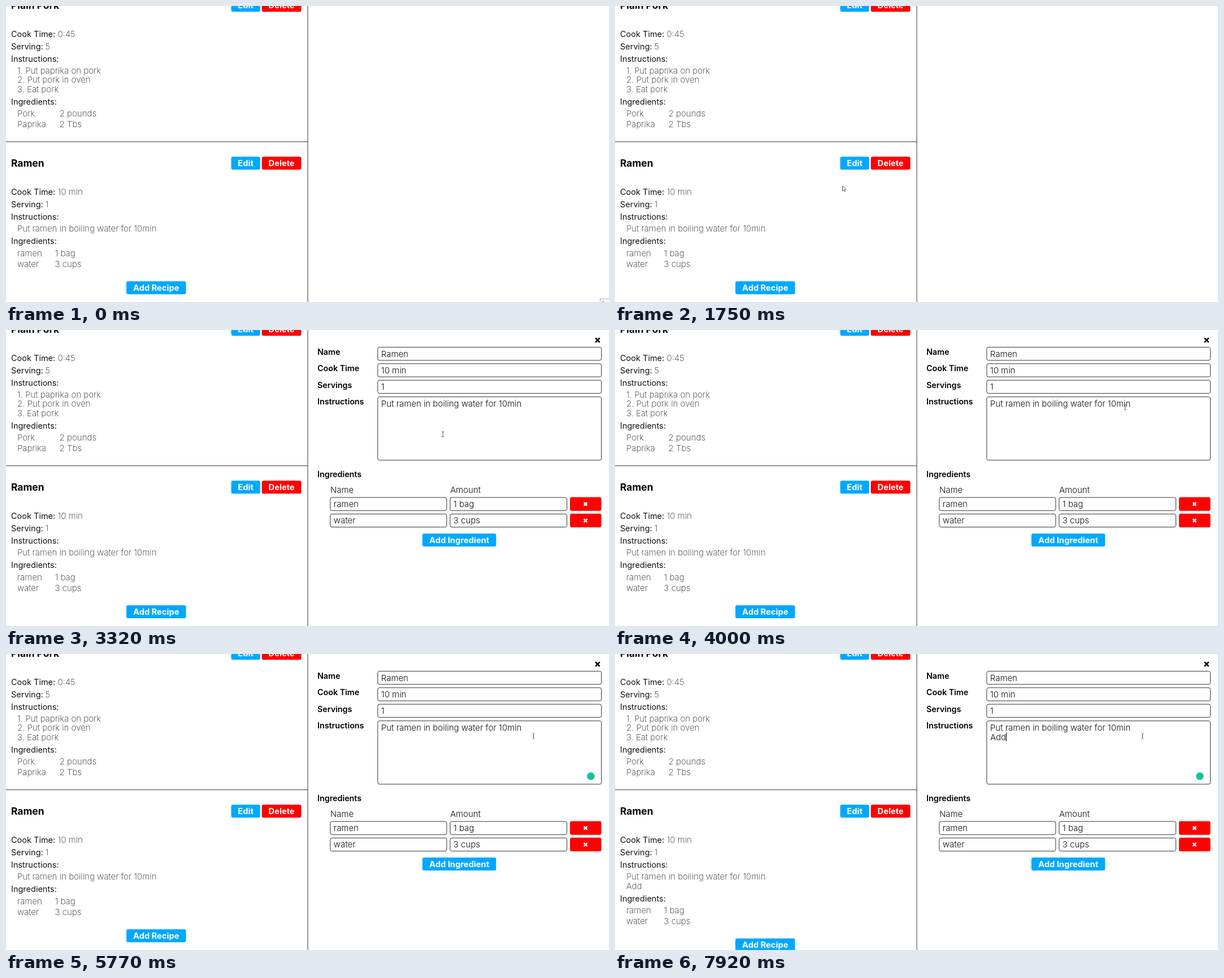
An HTML page that plays this animation: 1067x525 px, repeating every 7990 ms.

```html
<!DOCTYPE html>
<html lang="en">
<head>
<meta charset="utf-8">
<title>Recipe editor</title>
<style>
  html, body { margin: 0; width: 100%; height: 100%; overflow: hidden; background: #fff; }
  svg { display: block; width: 1067px; height: 525px; }
  text { font: 400 14.5px Inter, sans-serif; fill: #111; }
  .light { font-size: 15.1px; font-weight: 250; fill: #222; }
  .value { font-size: 14.95px; font-weight: 350; }
  .bold { font-size: 14.3px; font-weight: 600; fill: #000; }
  .title { font-size: 17.4px; font-weight: 700; fill: #000; }
  .button { font-size: 14.7px; font-weight: 700; fill: #fff; text-anchor: middle; }
  .field { fill: #fff; stroke: #333; }
  .rule { stroke: #333; }
  .cross { stroke-width: 2.6; fill: none; }
</style>
</head>
<body>
<svg id="stage" viewBox="0 0 1067 525"></svg>
<script>
const LOOP = 7990, BLUE = '#00a8ff', DARK_BLUE = '#0077b5', RED = '#f00';
const stage = document.getElementById('stage');
const $ = id => document.getElementById(id);

const text = (x, y, str, cls = '', id = '') =>
  `<text x="${x}" y="${y}" class="${cls}" id="${id}">${str}</text>`;
const box = (x, y, w, h, attrs) =>
  `<rect x="${x}" y="${y}" width="${w}" height="${h}" rx="3" ${attrs}/>`;
const field = (x, y, w, h, value) =>
  box(x, y, w, h, 'class="field"') + text(x + 6, y + 17, value, 'value');
const button = (x, y, w, color, label, id = '') =>
  box(x, y, w, 23, `fill="${color}" id="${id}"`) + text(x + w / 2, y + 16.9, label, 'button');
const cross = (x, y, r, color) =>
  `<path class="cross" stroke="${color}" d="M${x - r} ${y - r}l${2 * r} ${2 * r}m0 ${-2 * r}l${-2 * r} ${2 * r}"/>`;

function recipeHead(y, name, time, servings, editId) {
  return text(9, y + 285, name, 'title') +
    button(398.5, y + 267.2, 51.2, BLUE, 'Edit', editId) +
    button(452.7, y + 267.2, 69.8, RED, 'Delete') +
    text(9, y + 334.5, 'Cook Time:') + text(91.5, y + 334.5, time, 'light') +
    text(9, y + 356.5, 'Serving:') + text(69.5, y + 356.5, servings, 'light') +
    text(9, y + 378.5, 'Instructions:');
}

function ingredientList(y, x, rows) {
  return text(9, y, 'Ingredients:') + rows.map(([name, amount], i) =>
    text(20, y + 21.7 + i * 19, name, 'light') + text(x, y + 21.7 + i * 19, amount, 'light')).join('');
}

function ingredientRow(y, name, amount) {
  return field(573.8, y, 206, 23.3, name) + field(785.8, y, 206.7, 23.3, amount) +
    box(998, y - .5, 55.5, 24.3, `fill="${RED}"`) + cross(1025.5, y + 11.7, 2.8, '#fff');
}

const recipes =
  recipeHead(-280, 'Plain Pork', '0:45', '5', 'porkEdit') +
  ['Put paprika on pork', 'Put pork in oven', 'Eat pork'].map((step, i) =>
    text(20, 120 + i * 16.3, `${i + 1}. ${step}`, 'light')).join('') +
  ingredientList(174.5, 94.5, [['Pork', '2 pounds'], ['Paprika', '2 Tbs']]) +
  recipeHead(0, 'Ramen', '10 min', '1', 'edit') +
  text(20, 400, 'Put ramen in boiling water for 10min', 'light') +
  text(20, 416.5, '', 'light', 'savedLine') +
  `<g id="below">${ingredientList(422.3, 86.5, [['ramen', '1 bag'], ['water', '3 cups']])}
   ${button(213, 488.2, 105.5, BLUE, 'Add Recipe')}</g>
   <path class="rule" d="M0 240.8H534M534 0V525"/>`;

const form = `<g id="form">
  ${cross(1046.8, 18, 3.8, '#000')}
  ${['Name', 'Cook Time', 'Servings', 'Instructions'].map((label, i) =>
    text(551, 44 + i * 29.3, label, 'bold')).join('')}
  ${['Ramen', '10 min', '1'].map((value, i) => field(657.8, 30.5 + i * 29.3, 395.7, 23.3, value)).join('')}
  ${field(657.8, 118.6, 395.7, 112.3, 'Put ramen in boiling water for 10min')}
  ${text(664, 152.5, '', 'value', 'typedLine')}
  <path id="caret" stroke="#000" d="M0 0v16"/>
  <circle id="badge" cx="1034.8" cy="216.8" r="6.8" fill="#15c39a"/>
  ${text(551, 261, 'Ingredients', 'bold')}${text(574, 288.5, 'Name', 'value')}${text(786, 288.5, 'Amount', 'value')}
  ${ingredientRow(297, 'ramen', '1 bag')}${ingredientRow(326.3, 'water', '3 cups')}
  ${button(736.8, 361.1, 130.5, BLUE, 'Add Ingredient')}
</g>`;

const pointers = `
  <g id="corner" fill="#fff" stroke="#aaa"><rect x="1051.5" y="519.5" width="20" height="9"/><path stroke="#555" d="M1055 524.5h3"/></g>
  <g id="pointer" stroke-linejoin="round">
    <path id="arrow" fill="#fff" stroke="#444" stroke-width=".9" d="M.5 0V9.3L2.6 7.4 4.1 10.6 5.5 10 4.1 6.9H6.7Z"/>
    <path id="hand" fill="#fff" stroke="#222" stroke-width=".9"
      d="M-1 1Q0-.6 1 1V5L4 5.6Q5.4 6 5.1 8L4.3 12H-.6L-3.6 8Q-4-.2 -1 7.8Z"/>
    <path id="beam" fill="none" stroke="#444" stroke-width=".9" d="M-2-4.5H-.7L0-4 .7-4.5H2M0-4V4M-2 4.5H-.7L0 4 .7 4.5H2"/>
  </g>`;

stage.innerHTML = recipes + form + pointers;

// Pointer path: time, x, y
const path = [
  [410, 1018, 520], [620, 830, 420], [830, 590, 338], [1000, 420, 314], [1170, 274, 338],
  [1290, 222, 374], [1430, 252, 385], [1600, 355, 350], [1750, 402, 319], [1960, 408, 292],
  [2060, 415, 283], [2160, 417, 280], [2560, 417, 280], [2700, 446, 322], [2850, 535, 360],
  [3000, 645, 352], [3150, 728, 262], [3320, 773, 185], [3400, 770, 186], [3520, 767, 184],
  [3700, 812, 167], [3900, 885, 143], [4130, 915, 133], [4280, 917, 133], [4440, 928, 142],
  [4600, 933.5, 145.5], [LOOP, 933.5, 145.5]
];

function pointerAt(t) {
  const i = Math.max(0, path.findIndex(p => p[0] > t) - 1);
  const at = n => path[Math.min(path.length - 1, Math.max(0, n))];
  const [a, b] = [at(i), at(i + 1)], span = b[0] - a[0];
  const u = Math.max(0, (t - a[0]) / span);
  const slope = (n, k) => {
    const p = at(n - 1), q = at(n), r = at(n + 1);
    const d0 = (q[k] - p[k]) / (q[0] - p[0] || 1), d1 = (r[k] - q[k]) / (r[0] - q[0] || 1);
    return d0 * d1 > 0 ? 2 * d0 * d1 / (d0 + d1) : 0;
  };
  return [1, 2].map(k =>
    a[k] + (b[k] - a[k]) * u * u * (3 - 2 * u) +
    span * u * (1 - u) * ((1 - u) * slope(i, k) - u * slope(i + 1, k)));
}

const show = (id, on) => $(id).setAttribute('visibility', on ? 'inherit' : 'hidden');
const inside = (x, y, l, t, r, b) => x > l && x < r && y > t && y < b;

function draw(t) {
  const open = t >= 2230;
  const [x, y] = pointerAt(t);
  const onEdit = inside(x, y, 398, 267, 450, 290);
  const onField = open && (inside(x, y, 657, 118, 1054, 231) ||
    inside(x, y, 573, 296, 780, 320) || inside(x, y, 573, 326, 780, 350));

  show('corner', t < 130);
  show('form', open);
  show('pointer', t >= 410);
  $('pointer').setAttribute('transform', `translate(${x} ${y})`);
  show('hand', onEdit);
  show('beam', onField);
  show('arrow', !onEdit && !onField);
  $('edit').setAttribute('fill', onEdit ? DARK_BLUE : BLUE);

  const typed = 'Add'.slice(0, [7240, 7600, 7800].filter(key => t >= key).length);
  $('typedLine').textContent = $('savedLine').textContent = typed;
  $('below').setAttribute('transform', `translate(0 ${typed ? 16.3 : 0})`);
  show('badge', t >= 4130);

  // The caret restarts its blink on each key press.
  const lastKey = [4190, 5080, 7240, 7600, 7800].filter(key => t >= key).pop();
  const secondLine = t >= 5080;
  const caretX = secondLine ? 664.5 + $('typedLine').getComputedTextLength() : 917.5;
  $('caret').setAttribute('transform', `translate(${caretX} ${secondLine ? 139 : 122})`);
  show('caret', lastKey && (t - lastKey) % 1060 < 540);
}

function tick() {
  draw(performance.now() % LOOP);
  requestAnimationFrame(tick);
}
tick();
</script>
</body>
</html>
```
